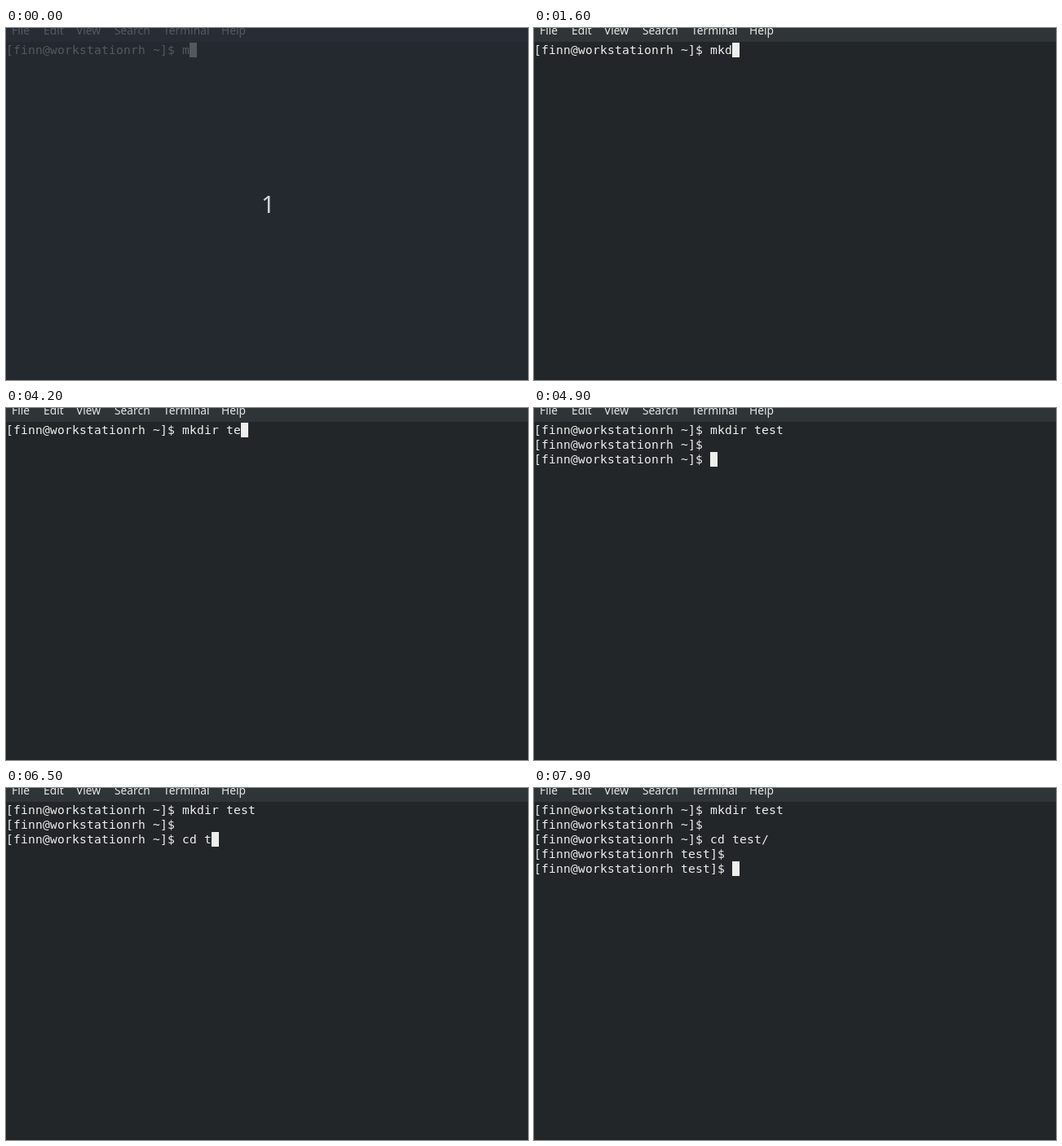
Write an HTML page with a canvas that moves like this. It is 640x432 px and loops after 8 s.

```html
<!DOCTYPE html>
<html lang="en">
<head>
<meta charset="utf-8">
<title>Terminal</title>
<style>
  html, body { margin: 0; width: 100%; height: 100%; overflow: hidden; background: #222628; }
  canvas { display: block; }
</style>
</head>
<body>
<canvas id="stage" width="640" height="432"></canvas>
<script>
const ctx = document.getElementById("stage").getContext("2d");
const LOOP = 8000, CELL = 9, ROW = 18, TOP = 18;
const COUNTDOWN_END = 300;

const MENU = [["File", 7], ["Edit", 46], ["View", 86], ["Search", 133], ["Terminal", 193], ["Help", 264]];

const DIM = { back: "#24292f", bar: "#282d35", menu: "#55595e", text: "#55585b" };
const LIT = { back: "#222628", bar: "#2f3437", menu: "#e6e7e5", text: "#eeeeec" };

// Typed lines at each moment; a trailing "^" means the cursor has blinked off.
const MADE = "mkdir test\n\n", ENTERED = MADE + "cd test/\n";
const STEPS = [
  [0, "m"], [500, ""], [600, "m"], [800, "mdk"], [1300, "md"], [1400, "m"],
  [1600, "mkd"], [1700, "mkdri"], [2000, "mkdri "], [2500, "mkdri"], [2700, "mkdri^"],
  [2900, "mkdr"], [3100, "mkd"], [3200, "mkdir"], [3300, "mkdir "], [3800, "mkdir ^"],
  [4100, "mkdir t"], [4200, "mkdir te"], [4500, "mkdir tes"], [4600, "mkdir test"],
  [4800, "mkdir test\n"], [4900, MADE], [5400, MADE + "^"],
  [5800, MADE + "c"], [5900, MADE + "cd"], [6100, MADE + "cd "],
  [6500, MADE + "cd t"], [6600, MADE + "cd te"], [6800, MADE + "cd test/"],
  [7300, MADE + "cd test/^"], [7400, MADE + "cd test/"],
  [7500, ENTERED], [7900, ENTERED + "\n"]
];

function prompt(row) {
  return `[finn@workstationrh ${row < 3 ? "~" : "test"}]$ `;
}

function drawMenu(colors) {
  ctx.fillStyle = colors.bar;
  ctx.fillRect(0, 0, 640, 17);
  ctx.fillStyle = colors.menu;
  ctx.font = '13.8px "Noto Sans", sans-serif';
  for (const [label, x] of MENU) ctx.fillText(label, x, 8);
}

function drawTerminal(state, colors) {
  const cursorOn = !state.endsWith("^");
  const lines = state.replace("^", "").split("\n").map((typed, row) => prompt(row) + typed);
  ctx.fillStyle = colors.text;
  ctx.font = '14.67px "DejaVu Sans Mono", monospace';
  lines.forEach((line, row) => {
    [...line].forEach((char, col) => ctx.fillText(char, col * CELL, TOP + row * ROW + 14));
  });
  if (cursorOn) {
    const row = lines.length - 1;
    ctx.fillRect(lines[row].length * CELL, TOP + row * ROW, CELL, ROW);
  }
}

function drawCountdown() {
  ctx.fillStyle = "#d3d4d5";
  ctx.font = '29.4px "Noto Sans", sans-serif';
  ctx.fillText("1", 313, 227);
}

function draw(now) {
  const time = now % LOOP;
  const counting = time < COUNTDOWN_END;
  const colors = counting ? DIM : LIT;
  ctx.fillStyle = colors.back;
  ctx.fillRect(0, 0, 640, 432);
  drawMenu(colors);
  drawTerminal(STEPS.findLast(([start]) => start <= time)[1], colors);
  if (counting) drawCountdown();
}

const begin = performance.now();
function tick() {
  draw(performance.now() - begin);
  requestAnimationFrame(tick);
}
tick();
</script>
</body>
</html>
```
